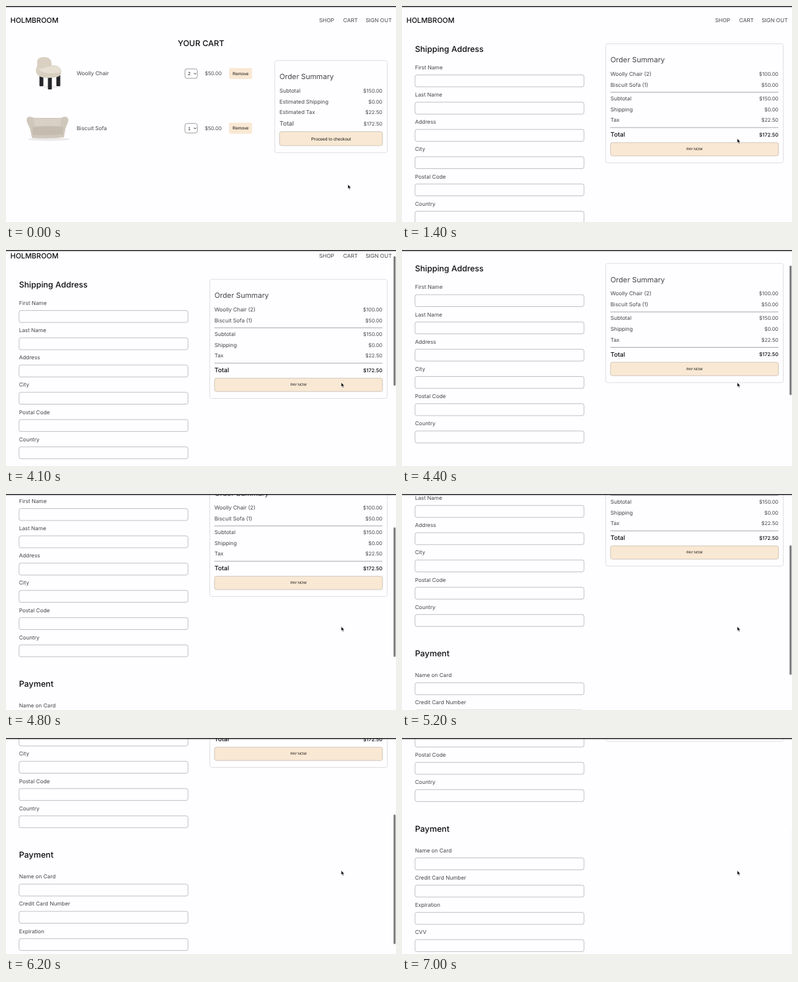
Write an HTML page that moves like this. It is 600 by 334 pixels and loops after 7.3 s.

```html
<!DOCTYPE html>
<html lang="en">
<head>
<meta charset="utf-8">
<title>Checkout</title>
<style>
  html, body { margin: 0; width: 100%; height: 100%; overflow: hidden; background: #fefdff; }
  svg { display: block; width: 600px; height: 334px; }
  text { font-family: Inter, "Open Sans", sans-serif; text-rendering: geometricPrecision; white-space: pre; }
  .ui { font-family: "Liberation Sans", Arial, sans-serif; }
</style>
</head>
<body>
<svg id="stage" viewBox="0 0 600 334">
  <rect width="600" height="334" fill="#fefdff"/>
  <g id="page">
    <g id="head"></g>
    <g id="cart"></g>
    <g id="checkout"></g>
  </g>
  <rect id="thumb" x="596.3" width="3" rx="1.2" fill="#777679"/>
  <rect width="600" height="1.6" fill="#2b292d"/>
  <path id="cursor" d="M0 0V6.6L1.5 5.3L2.6 7.8L3.8 7.3L2.7 4.9H4.7Z" fill="#000" stroke="#fff" stroke-width=".5"/>
</svg>
<script>
const LOOP = 7300, STEP = 100;
const NS = "http://www.w3.org/2000/svg";
const $ = id => document.getElementById(id);

function add(parent, tag, attrs, content) {
  const el = document.createElementNS(NS, tag);
  for (const k in attrs) el.setAttribute(k, attrs[k]);
  if (content) el.textContent = content;
  parent.appendChild(el);
}

// y is the middle of the capital letters
function label(g, s, x, y, size = 8.3, opt = {}) {
  add(g, "text", { x, y: y + size * 0.36, "font-size": size, fill: "#454447", ...opt }, s);
}

const END = { "text-anchor": "end" };
const MID = { "text-anchor": "middle" };
const DARK = { fill: "#0c0b0d", "font-weight": 500 };

function box(g, x, y, w, h, opt = {}) {
  add(g, "rect", { x, y, width: w, height: h, rx: 3, fill: "none", stroke: "#d6d5d8", "stroke-width": 0.8, ...opt });
}

function button(g, s, x, y, w, h, size, opt = {}) {
  box(g, x, y, w, h, { fill: "#f9e8d3", stroke: "#c4bbb0", ...opt });
  label(g, s, x + w / 2, y + h / 2, size, { class: "ui", fill: "#111", ...MID });
}

function line(g, x, name, price, y, size = 8.3, opt = {}) {
  label(g, name, x, y, size, opt);
  label(g, price, 579, y, 7.8, { ...opt, ...END });
}

function rule(g, y) {
  add(g, "path", { d: `M320.5 ${y}H579`, stroke: "#9c9b9e", "stroke-width": 0.9 });
}

function field(g, name, y) {
  label(g, name, 20, y);
  box(g, 20, y + 11.6, 260, 18.4, { stroke: "#b0afb2" });
}

function shape(g, d, fill) { add(g, "path", { d, fill }); }

function chair(g) {
  add(g, "ellipse", { cx: 68, cy: 125, rx: 17, ry: 2.5, fill: "#f1eff0" });
  for (const [x, y, h] of [[51.5, 106, 18], [64.5, 107, 22], [77.5, 106, 18]])
    add(g, "rect", { x, y, width: 6, height: h, rx: 1, fill: "#25262a" });
  shape(g, "M48 88C47 81 53 78.5 59 79C67 79 71 84 70 92C79 91 85 95 85 102C85 109 78 111 68 111C56 112 47 109 46 101C45.500 96 49 94 48 88Z", "#d9d0c2");
  shape(g, "M49 96C57 99 63 93 70 93C80 92 85 97 84 102C76 105 55 106 49 96Z", "#e7dfd3");
}

function sofa(g) {
  add(g, "ellipse", { cx: 66, cy: 206, rx: 32, ry: 2.5, fill: "#ece9e9" });
  shape(g, "M32 174C33 170 39 171 43 173H85C89 170 95 171 96 175C96 181 92 186 91 192L89 203Q65 206 40 204L37 190C35 184 31 180 32 174Z", "#cfc7bb");
  shape(g, "M43 174H85L83 187H44Z", "#d8d0c5");
  shape(g, "M41 187Q63 184 88 187L87 198Q64 201 41 199Z", "#c5bcaf");
}

function cartRow(g, name, count, y) {
  label(g, name, 108.7, y);
  box(g, 275.3, y - 7.3, 19, 14.6, { fill: "#fff", stroke: "#858488" });
  label(g, count, 280, y, 7, { class: "ui", fill: "#111" });
  add(g, "path", { d: `M289.200 ${y - 0.8}l1.700 1.700l1.700 -1.700`, fill: "none", stroke: "#222", "stroke-width": 1 });
  label(g, "$50.00", 305.7, y, 7.8);
  button(g, "Remove", 343.3, y - 8.5, 35.2, 17, 6.7, { stroke: "none", rx: 2 });
}

function build() {
  const head = $("head"), cart = $("cart"), pay = $("checkout");

  label(head, "HOLMBROOM", 6.7, 22.5, 11, DARK);
  label(head, "SHOP", 481.7, 22.5);
  label(head, "CART", 518.8, 22.5);
  label(head, "SIGN OUT", 593.5, 22.5, 8.3, END);

  label(cart, "YOUR CART", 300, 57.5, 12.3, { ...DARK, ...MID });
  chair(cart);
  sofa(cart);
  cartRow(cart, "Woolly Chair", "2", 104.5);
  cartRow(cart, "Biscuit Sofa", "1", 189);
  box(cart, 413.5, 84.3, 173, 142.5);
  label(cart, "Order Summary", 420.7, 109, 11.2);
  line(cart, 420.7, "Subtotal", "$150.00", 131);
  line(cart, 420.7, "Estimated Shipping", "$0.00", 147.7);
  line(cart, 420.7, "Estimated Tax", "$22.50", 164.3);
  line(cart, 420.7, "Total", "$172.50", 182, 9.6);
  button(cart, "Proceed to checkout", 420.8, 194.3, 158.4, 21.6, 6.7);

  label(pay, "Shipping Address", 20, 66, 12.5, DARK);
  ["First Name", "Last Name", "Address", "City", "Postal Code", "Country"]
    .forEach((s, i) => field(pay, s, 95 + i * 42.15));
  label(pay, "Payment", 20, 377.5, 12.7, DARK);
  ["Name on Card", "Credit Card Number", "Expiration", "CVV"]
    .forEach((s, i) => field(pay, s, 411.3 + i * 42.15));
  box(pay, 313.5, 58.3, 273, 184.2);
  label(pay, "Order Summary", 320.7, 83.3, 11.2);
  line(pay, 320.7, "Woolly Chair (2)", "$100.00", 105);
  line(pay, 320.7, "Biscuit Sofa (1)", "$50.00", 121.8);
  rule(pay, 133.3);
  line(pay, 320.7, "Subtotal", "$150.00", 143);
  line(pay, 320.7, "Shipping", "$0.00", 159.8);
  line(pay, 320.7, "Tax", "$22.50", 176.3);
  rule(pay, 188);
  line(pay, 320.7, "Total", "$172.50", 199, 9.6, DARK);
  button(pay, "PAY NOW", 320.8, 211.2, 258.4, 20.6, 5.5);
}

// [time, value] points joined by a smooth curve without overshoot
function curve(keys, t) {
  const n = keys.length - 1;
  if (t <= keys[0][0]) return keys[0][1];
  if (t >= keys[n][0]) return keys[n][1];
  const rate = i => (keys[i + 1][1] - keys[i][1]) / (keys[i + 1][0] - keys[i][0]);
  const slope = i => {
    if (i === 0 || i === n) return 0;
    const a = rate(i - 1), b = rate(i);
    return a * b <= 0 ? 0 : 2 * a * b / (a + b);
  };
  let i = 0;
  while (t >= keys[i + 1][0]) i++;
  const d = keys[i + 1][0] - keys[i][0], u = (t - keys[i][0]) / d, v = 1 - u;
  return v * v * (1 + 2 * u) * keys[i][1] + u * u * (3 - 2 * u) * keys[i + 1][1]
    + d * u * v * (v * slope(i) - u * slope(i + 1));
}

const scrollKeys = [[3700, 0], [3800, 0.6], [4100, 13], [4400, 37.5], [4800, 84], [5200, 131],
  [5500, 147], [5800, 147], [6200, 197], [6500, 232], [6700, 237], [6800, 237.5]];
const xKeys = [[0, 526], [800, 511], [900, 511], [1100, 509], [1300, 509], [1400, 515.8]];
const yKeys = [[0, 276], [800, 205], [900, 205], [1100, 203.5], [1300, 203.5], [1400, 205]];
const fadeKeys = [[6600, 1], [7000, 0.03]];

function draw(now) {
  const t = Math.floor(now % LOOP / STEP) * STEP;
  const y = curve(scrollKeys, t);
  const paying = t >= 1300;
  $("cart").style.display = paying ? "none" : "";
  $("checkout").style.display = paying ? "" : "none";
  $("page").setAttribute("transform", `translate(0 ${-y})`);
  const top = 2 + y * 0.592;
  $("thumb").setAttribute("y", top);
  $("thumb").setAttribute("height", Math.min(200, 333 - top));
  $("thumb").setAttribute("opacity", t < 3800 ? 0 : curve(fadeKeys, t));
  $("cursor").setAttribute("transform", `translate(${curve(xKeys, t)} ${curve(yKeys, t)})`);
}

function tick() {
  draw(performance.now());
  requestAnimationFrame(tick);
}

build();
tick();
</script>
</body>
</html>
```
